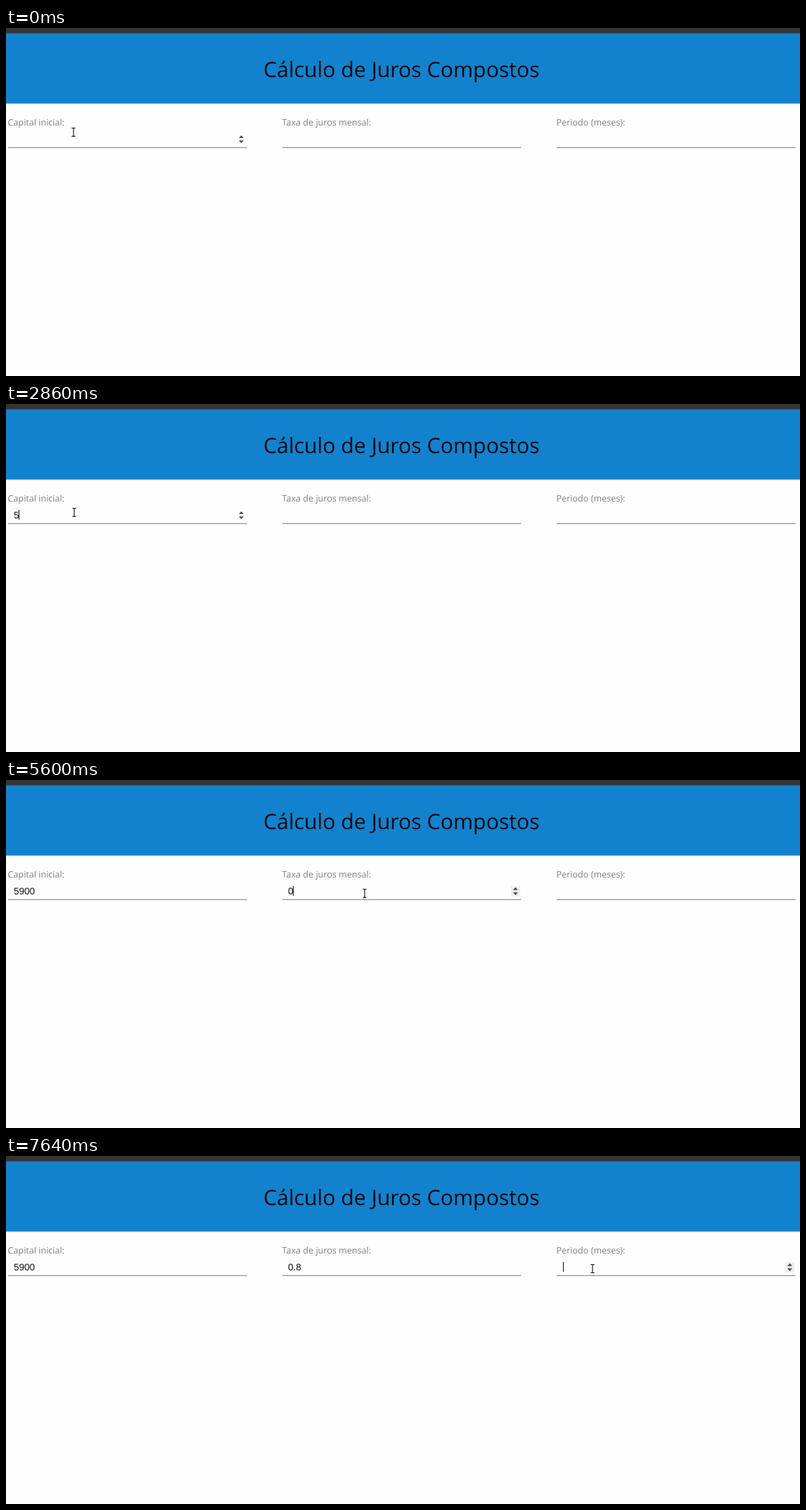
Write an HTML page that moves like this. It is 1129 px wide and 496 px high and loops after 8 s.

```html
<!DOCTYPE html>
<html lang="pt">
<head>
<meta charset="utf-8">
<title>Juros Compostos</title>
<style>
  html, body { margin: 0; width: 100%; height: 100%; overflow: hidden; background: #fefefe; }
  svg { display: block; width: 1129px; height: 496px; }
  text { text-rendering: geometricPrecision; white-space: pre; }
  .title { font: 30.25px "Open Sans", "Noto Sans", sans-serif; fill: #06090c; }
  .label { font: 12.6px "Open Sans", "Noto Sans", sans-serif; fill: #7e7e7e; }
  .value { font: 13.5px "Liberation Sans", Arial, sans-serif; fill: #111; }
</style>
</head>
<body>
<svg viewBox="0 0 1129 496">
  <rect width="1129" height="496" fill="#fefefe"/>
  <rect width="1129" height="8" fill="#353535"/>
  <rect y="7.5" width="1129" height="100.2" fill="#1282ce"/>
  <text class="title" x="366" y="70">Cálculo de Juros Compostos</text>
  <g id="form"></g>
  <rect id="caret" y="151" width="1" height="14" fill="#111"/>
  <path id="beam" fill="none" stroke="#222" stroke-width="1.2"
        d="M-2.6-5.4H-.7L0-4.8 .7-5.4H2.6M0-5V6M-2.6 6.4H-.7L0 5.8 .7 6.4H2.6"/>
  <path id="arrow" fill="#fff" stroke="#111"
        d="M.5 .8V16.4L4.2 12.9 6.6 18.4 8.9 17.4 6.5 12H11.4Z"/>
</svg>
<script>
const LOOP = 8000, STEP = 135, COLUMN = 390, DIGIT = 7.5;
const $ = id => document.getElementById(id);
const show = (el, on) => el.setAttribute('visibility', on ? 'visible' : 'hidden');
const smooth = u => u * u * (3 - 2 * u);

// hover: spinner appears; focus: caret appears; typing starts at `type` and lasts `span`
const fields = [
  { label: 'Capital inicial:', hover: 0, focus: 1300, blink: 1160, text: '5900', type: 2860, span: 1100, curve: 1.5 },
  { label: 'Taxa de juros mensal:', hover: 4530, focus: 4930, blink: 700, text: '0.8', type: 5600, span: 1120, curve: 1 },
  { label: 'Periodo (meses):', hover: 7400, focus: 7640, blink: 1160, text: '', type: LOOP, span: 1, curve: 1 }
];

// Each leg carries the pointer on from the end of the one before, bulging by `arc`
const rest = { x: 96, y: 148 };
const legs = [
  { at: 740, span: 340, x: 97, y: 154, arc: 0 },
  { at: 4260, span: 340, x: 506, y: 168, arc: 26 },
  { at: 4780, span: 60, x: 507, y: 160, arc: 0 },
  { at: 4930, span: 300, x: 510, y: 161, arc: 0 },
  { at: 6960, span: 540, x: 834, y: 160, arc: -6 }
];

function add(parent, tag, attrs) {
  const el = document.createElementNS('http://www.w3.org/2000/svg', tag);
  for (const k in attrs) el.setAttribute(k, attrs[k]);
  return parent.appendChild(el);
}

fields.forEach((f, i) => {
  const next = fields[i + 1] || { hover: LOOP, focus: LOOP };
  f.blur = next.hover;
  f.leave = next.focus;
  f.x = 3 + COLUMN * i;
  f.textX = f.x + 8.4;
  f.spinX = f.x + 331.5;

  const form = $('form');
  add(form, 'text', { class: 'label', x: f.x - 0.5, y: 138.5 }).textContent = f.label;
  add(form, 'rect', { x: f.x, y: 170, width: 339.5, height: 1, fill: '#808080' });
  f.value = add(form, 'text', { class: 'value', x: f.textX - 0.3, y: 163 });
  f.spin = add(form, 'g', { transform: `translate(${f.spinX} 158.5)` });
  f.back = add(f.spin, 'rect', { x: -6.5, y: -7.5, width: 13, height: 15, fill: '#efefef' });
  add(f.spin, 'path', { d: 'M-3.5-1.8L0-5.5 3.5-1.8ZM-3.5 1.8L0 5.5 3.5 1.8Z', fill: '#454545' });
});

function typedText(f, t) {
  if (t < f.type) return '';
  const part = Math.min(1, (t - f.type) / f.span);
  return f.text.slice(0, 1 + Math.floor((f.text.length - 1) * part ** f.curve));
}

function caretX(f, text) {
  const width = [...text].reduce((w, c) => w + (c === '.' ? DIGIT / 2 : DIGIT), 0);
  return Math.floor(f.textX + (width || 0.6));
}

function caretOn(f, t) {
  if (t < f.focus || t >= f.blur) return false;
  return t >= f.type || (t - f.focus) % f.blink < 0.6 * f.blink;
}

function pointerAt(t) {
  let p = rest;
  for (const leg of legs) {
    if (t < leg.at) break;
    const shown = (Math.floor((t - leg.at) / STEP) + 0.5) * STEP;
    const u = Math.min(1, shown / leg.span), e = smooth(u);
    p = {
      x: p.x + (leg.x - p.x) * e,
      y: p.y + (leg.y - p.y) * e + leg.arc * Math.sin(Math.PI * u)
    };
  }
  return { x: Math.round(p.x), y: Math.round(p.y) };
}

function draw(t) {
  show($('caret'), false);
  for (const f of fields) {
    const text = typedText(f, t);
    f.value.textContent = text;
    f.spin.style.display = t >= f.hover && t < f.leave ? '' : 'none';
    show(f.back, t >= legs[1].at);
    if (caretOn(f, t)) {
      show($('caret'), true);
      $('caret').setAttribute('x', caretX(f, text));
    }
  }

  const { x, y } = pointerAt(t);
  const overText = y < 168 && fields.some(f => x >= f.x && x < f.spinX - 7);
  show($('beam'), overText);
  show($('arrow'), !overText);
  $(overText ? 'beam' : 'arrow').setAttribute('transform', `translate(${x} ${y})`);
}

const start = performance.now();
function tick() {
  draw((performance.now() - start) % LOOP);
  requestAnimationFrame(tick);
}
tick();
</script>
</body>
</html>
```
